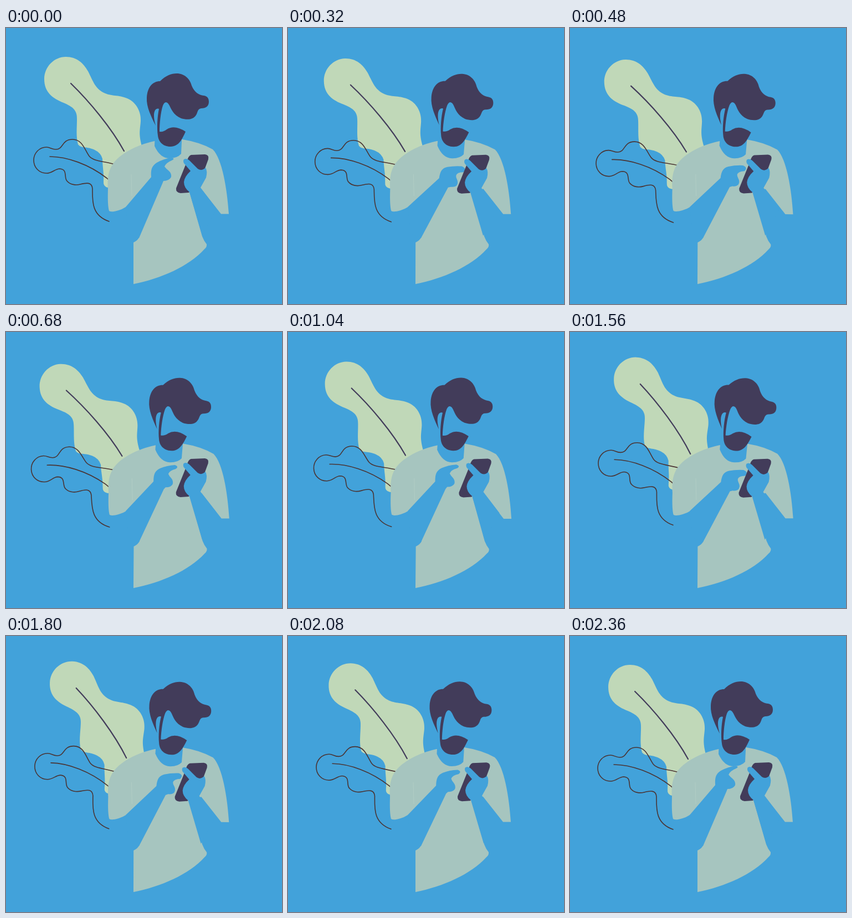
Animation of 498 by 498 pixels, one loop 2.4 s. Source, as an HTML page:

```html
<!DOCTYPE html>
<html lang="en">
<head>
<meta charset="utf-8">
<title>Man with a phone</title>
<style>
  html, body { margin: 0; width: 100%; height: 100%; overflow: hidden; background: #42a2da; }
  svg { display: block; width: 100vw; height: 100vh; }
  .sky { fill: #42a2da; }
  .dark { fill: #423c5a; }
  .shirt { fill: #a6c5bf; }
  .line { fill: none; stroke: #4a3434; stroke-width: 1.6; stroke-linecap: round; }
</style>
</head>
<body>
<svg viewBox="0 0 498 498">
  <g id="leaf">
    <path fill="#c0d8b8" d="M69 92C69 70 87 52 108 52C128 52 140 64 148 78C158 98 160 106 173 115C188 124 200 120 216 126C234 132 244 150 243 168C242 184 239 190 245 213L250 290L184 288Q175 286 176 277C177 262 174 250 174 236Q171 225 160 220C146 213 136 218 130 210C126 196 128 180 128 165C129 148 120 142 104 135C84 127 69 116 69 92Z"/>
    <path class="line" style="stroke:#423c5a;stroke-width:2.2" d="M117 100C150 132 190 180 213 222"/>
  </g>
  <g id="sprig" class="line">
    <path d="M200 247C176 240 158 241 150 231C142 220 138 201 120 201C100 201 104 219 90 219C82 219 80 215 73 215C60 215 50 226 50 238.5C50 252 60 262 73 262C84 262 88 254 97 254C112 255 104 270 110 276C116 283 126 284 134 282C146 279 155 278 156 290C156 312 154 338 186 349"/>
    <path d="M79 232C110 232 150 246 182 271L192 280"/>
  </g>
  <g id="body">
    <path class="shirt" d="M230 462V387Q238 383 240 378L255 305L216 323Q210 327 203 329Q190 333 186 330Q183 320 184 290C182 262 188 245 208 230Q232 212 268 204L318 201Q350 206 373 219C390 236 399 290 402 335.500H388L352 290L331 296L354 376Q357 384 362 390Q363 395 358 399C330 430 280 452 230 462Z"/>
    <path fill="none" stroke="#b1cdc5" d="M226 264L227 303"/>
  </g>
  <g id="head">
    <path class="sky" d="M269 185L268 213Q278 235 295 235Q309 235 316 227L318 185Z"/>
    <path class="dark" d="M270 176C262 160 253 142 254 126C255 106 265 96 278 96C288 86 298 82 308 82C322 82 332 92 335 104C340 116 348 121 357 122C364 123 366 128 366 133C366 141 361 145 352 145C345 146 346 153 343 157C338 166 326 166 316 163C302 157 298 146 295 140C291 132 286 132 283 140C279 152 277 172 277 187Q284 188 290 183Q304 174 324 187C318 200 312 214 297 214C282 214 275 204 274 194C272 180 273 160 276 146C270 144 267 150 267 158C267 165 269 172 270 176Z"/>
  </g>
  <path id="arm" class="sky"/>
  <g id="phone">
    <path class="dark" d="M334 229L359 228Q367 229 365 237L358 256L330 297L315 298Q306 297 307 289L326 242Q329 230 334 229Z"/>
    <path class="sky" d="M321 237Q326 234 331 239L346 254Q353 259 360 252Q364 258 361 270L351 288L380 326L354 374L331 296Q321 288 321 278Q322 268 333 258L321 244Q319 240 321 237Z"/>
  </g>
</svg>
<script>
const LOOP = 2400, STEP = 40;
const $ = id => document.getElementById(id);

// Arm drawn back, and arm reaching the screen
const armBack = 'M216 323L262 269C261 255 263 249 272 243Q284 236 299 234Q306 236 299 239Q289 243 286 250Q289 254 293 257Q299 262 298 269Q294 276 284 276L282 281L240 379L222 372Z';
const armTap = 'M216 323L273 271C275 259 278 253 288 251Q300 249 314 250Q324 254 317 261Q306 261 304 266Q303 269 305 273Q308 279 305 284Q302 288 294 287L289 288L240 379L222 372Z';

// Each track is a list of [time, value] keys
const tracks = {
  leaf: [[0, 0], [640, -.038], [1680, .047], [2400, 0]],
  sprig: [[0, 0], [80, 0], [760, -.05], [1800, .019], [2400, 0]],
  body: [[0, 0], [1040, .009], [2200, 0], [2400, 0]],
  head: [[0, 0], [400, .04], [1000, .026], [1320, .06], [2400, 0]],
  arm: [[0, 0], [360, 1], [800, .25], [960, .25], [1360, 1], [1800, .85], [2400, 0]],
  phone: [[0, 0], [360, -2], [1000, 1.5], [1640, -2.6], [2400, 0]],
};
const pivots = { leaf: [258, 318], sprig: [247, 335], body: [235, 460], head: [290, 255] };

function valueAt(keys, t) {
  const i = keys.findIndex(key => key[0] > t);
  const [t0, a] = keys[i - 1], [t1, b] = keys[i];
  return a + (b - a) * (1 - Math.cos(Math.PI * (t - t0) / (t1 - t0))) / 2;
}

function mixPaths(from, to, k) {
  const ends = to.match(/\d+/g);
  let i = 0;
  return from.replace(/\d+/g, n => (+n + (ends[i++] - n) * k).toFixed(2) + ' ');
}

function draw(now) {
  const t = Math.floor(now % LOOP / STEP) * STEP;
  for (const [id, [x, y]] of Object.entries(pivots)) {
    const degrees = valueAt(tracks[id], t) * 180 / Math.PI;
    $(id).setAttribute('transform', `rotate(${degrees} ${x} ${y})`);
  }
  $('arm').setAttribute('d', mixPaths(armBack, armTap, valueAt(tracks.arm, t)));
  const shift = valueAt(tracks.phone, t);
  $('phone').setAttribute('transform', `translate(${shift} ${Math.abs(shift) * .35})`);
}

const start = performance.now();
(function tick() {
  draw(performance.now() - start);
  requestAnimationFrame(tick);
})();
</script>
</body>
</html>
```
